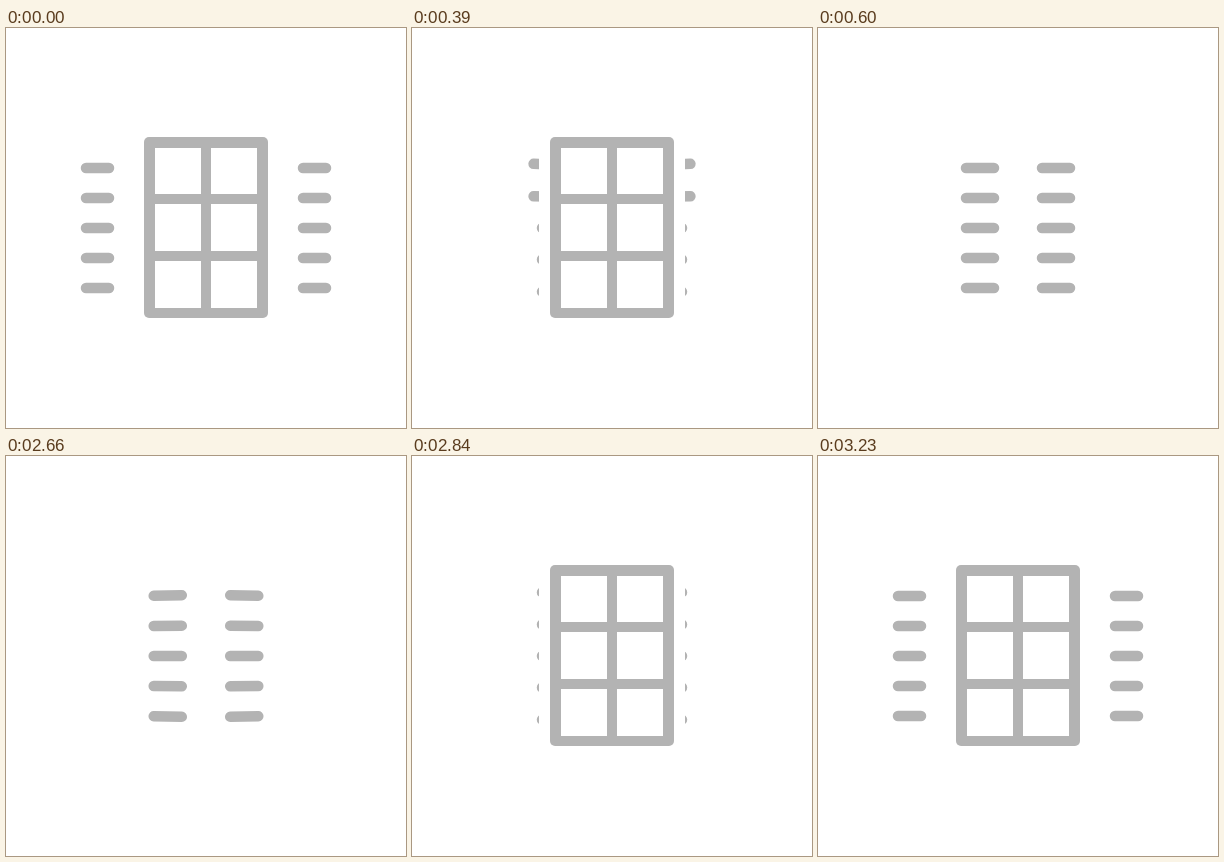
These frames come from a looping animation (400x400 px, 4.26 s). An HTML page with a canvas:

```html
<!DOCTYPE html>
<html lang="en">
<head>
<meta charset="utf-8">
<title>Grid and dashes</title>
<style>
  html, body { margin: 0; width: 100%; height: 100%; overflow: hidden; background: #fff; }
  canvas { display: block; }
</style>
</head>
<body>
<canvas width="400" height="400"></canvas>
<script>
const ctx = document.querySelector('canvas').getContext('2d');
const GRAY = '#b3b3b3';
const LOOP = 4260, MORPH = 600, OPEN_AT = 2630, STEP = 30;

// Smooth curve through [time, value] points.
function curve(points) {
  const slope = i => {
    const a = points[i - 1], b = points[i], c = points[i + 1];
    if (!a || !c) return 0;
    const before = (b[1] - a[1]) / (b[0] - a[0]);
    const after = (c[1] - b[1]) / (c[0] - b[0]);
    return before * after <= 0 ? 0 : 2 * before * after / (before + after);
  };
  return time => {
    if (time <= points[0][0]) return points[0][1];
    const i = points.findIndex(p => p[0] >= time);
    if (i < 0) return points[points.length - 1][1];
    const [t0, v0] = points[i - 1], [t1, v1] = points[i];
    const span = t1 - t0, s = (time - t0) / span, r = 1 - s;
    return v0 * (1 + 2 * s) * r * r + v1 * s * s * (3 - 2 * s)
      + span * s * r * (slope(i - 1) * r - slope(i) * s);
  };
}

// Distance from the centre line and outward bend for both ends of a dash.
const outerX = curve([[0, 52], [30, 52.3], [150, 65], [210, 70], [300, 116], [400, 122], [600, 120]]);
const innerX = curve([[0, 24], [30, 24.2], [150, 47], [210, 54], [300, 95], [400, 98], [600, 97]]);
const outerBend = curve([[0, 0], [30, 0.2], [150, 1], [210, 3.7], [300, 5], [400, 3], [540, 0.4], [600, 0]]);
const innerBend = curve([[0, 0], [30, 0.8], [150, 5], [210, 4], [300, 2], [400, 0.7], [600, 0]]);

function drawDashes(open, lag) {
  ctx.strokeStyle = GRAY;
  ctx.lineWidth = 10.5;
  ctx.lineCap = 'round';
  [-1, -0.4, 0, 0.4, 1].forEach((bend, row) => {
    const u = row < 2 ? open + lag : open;
    const y = 140 + row * 30;
    for (const side of [-1, 1]) {
      ctx.beginPath();
      ctx.moveTo(200 + side * outerX(u), y + bend * outerBend(u));
      ctx.lineTo(200 + side * innerX(u), y + bend * innerBend(u));
      ctx.stroke();
    }
  });
}

// The grid opens sideways from its centre; its white margin hides the dashes.
function drawGrid(open) {
  const p = Math.min(1, Math.max(0, (open - 60) / 140));
  if (!p) return;
  const half = 62 * p ** 1.7;
  ctx.fillStyle = '#fff';
  ctx.fillRect(189 - half, 100, 2 * half + 22, 200);
  ctx.save();
  ctx.beginPath();
  ctx.rect(200 - half, 100, 2 * half, 200);
  ctx.clip();
  ctx.fillStyle = GRAY;
  ctx.beginPath();
  ctx.roundRect(138, 109, 124, 181, 5);
  ctx.fill();
  ctx.fillStyle = '#fff';
  for (const x of [149, 205])
    for (const y of [120, 176, 233]) ctx.fillRect(x, y, 46, y === 120 ? 46 : 47);
  ctx.restore();
}

function draw(now) {
  const t = now % LOOP;
  const opening = t >= OPEN_AT;
  const elapsed = opening ? t - OPEN_AT : t;
  const time = Math.min(MORPH, Math.floor(elapsed / STEP) * STEP);
  const open = opening ? time : MORPH - time;
  ctx.fillStyle = '#fff';
  ctx.fillRect(0, 0, 400, 400);
  drawDashes(open, opening ? 0 : 25 * Math.sin(Math.PI * open / MORPH));
  drawGrid(open);
}

const start = performance.now();
function tick() {
  draw(performance.now() - start);
  requestAnimationFrame(tick);
}
tick();
</script>
</body>
</html>
```
